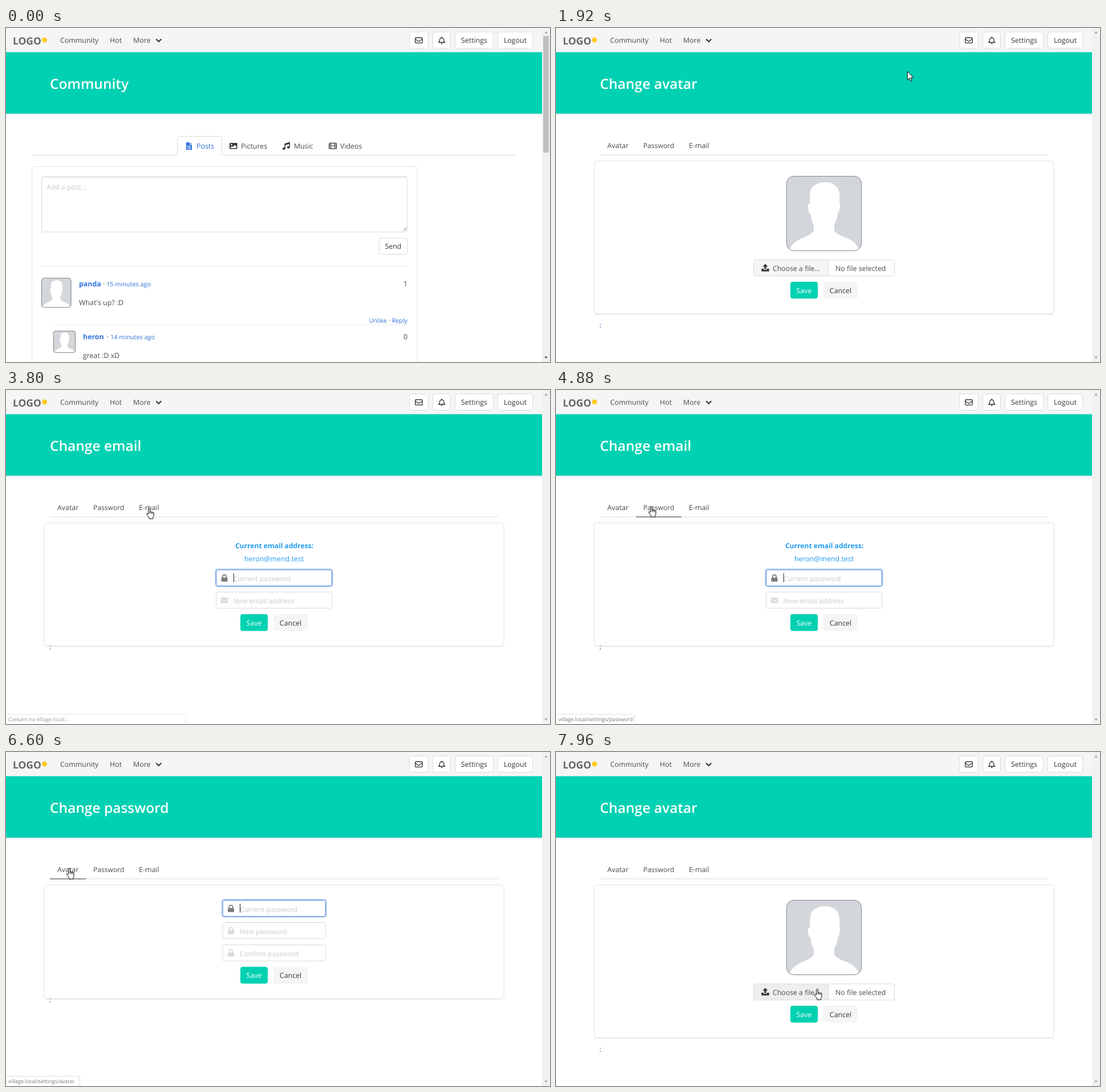
Recreate the animation shown at these times as an HTML page. Size 954 by 587 pixels, loop 8000 ms.

```html
<!DOCTYPE html>
<html lang="en">
<head>
<meta charset="utf-8">
<title>Account settings</title>
<style>
html, body { margin: 0; width: 100%; height: 100%; overflow: hidden; background: #fff; }
svg { display: block; width: 954px; height: 587px; }
text { font-family: "Open Sans", "Noto Sans", sans-serif; text-rendering: geometricPrecision; }
</style>
</head>
<body>
<svg id="stage" viewBox="0 0 954 587"></svg>
<script>
const stage = document.getElementById('stage');
const LOOP = 8000, STEP = 80;
const INK = '#4a4a4a', DARK = '#363636', LINE = '#dbdbdb', LINK = '#3273dc', TEAL = '#00d1b2', HINT = '#c9c9c9';
const HOST = 'village.local';

// Cursor keys: time, tip x, tip y
const path = [
  [160, 916, 559], [760, 827, 17], [1640, 827, 17], [2400, 276, 172], [2480, 276, 172],
  [2760, 251, 208], [4320, 251, 208], [4720, 167, 205], [6120, 167, 205], [6520, 111, 205],
  [7200, 111, 205], [7960, 458, 417]
];
// Status bar: text, start, end (links fade in, waiting fades out)
const wait = `Czekam na ${HOST}...`;
const statuses = [
  [`${HOST}/settings`, 920, 1280], [wait, 1280, 1820],
  [`${HOST}/settings/email`, 2640, 3320], [wait, 3320, 3980],
  [`${HOST}/settings/password`, 4720, 5120], [wait, 5120, 5660],
  [`${HOST}/settings/avatar`, 6520, 6760], [wait, 6760, 7380]
];

const clamp = v => Math.max(0, Math.min(1, v));
const within = (t, ...spans) => spans.some(([a, b]) => t >= a && t < b);

const text = (x, y, s, { size = 12.4, fill = INK, weight = 400, anchor = 'start' } = {}) =>
  `<text x="${x}" y="${y}" font-size="${size}" fill="${fill}" font-weight="${weight}" text-anchor="${anchor}">${s}</text>`;
const rect = (x, y, w, h, fill, stroke = 'none', r = 0, extra = '') =>
  `<rect x="${x}" y="${y}" width="${w}" height="${h}" fill="${fill}" stroke="${stroke}" rx="${r}" ${extra}/>`;
const fillPath = (d, fill = DARK) => `<path d="${d}" fill="${fill}"/>`;
const stroke = (d, color = DARK, width = 1.4) =>
  `<path d="${d}" fill="none" stroke="${color}" stroke-width="${width}"/>`;
const ring = (x, y, w, h) => rect(x - 1, y - 1, w + 2, h + 2, 'none', 'rgba(50,115,220,.25)', 4, 'stroke-width="2"');

function button(x, y, w, label, { fill = '#fff', edge = LINE, color = DARK } = {}) {
  return rect(x + .5, y + .5, w - 1, 28.5, fill, edge, 3) +
    text(x + w / 2, y + 19.7, label, { fill: color, anchor: 'middle' });
}

function card(x, y, w, h) {
  return rect(x - .5, y + 1.5, w + 1, h + 1, 'rgba(10,10,10,.06)', 'none', 5) +
    rect(x, y + .5, w, h, '#fff', '#e2e2e2', 5);
}

function avatar(x, y, size, r) {
  const k = size / 132;
  return rect(x, y, size, size, '#d3d6db', 'none', r) +
    `<g transform="translate(${x} ${y}) scale(${k})">` +
    fillPath('M4 131C8 122 16 114 28 109C38 105 47 101 48 95V86C45 82 43 75 43 67C40 67 38 60 38 53' +
      'C38 49 40 48 41.5 48C41 40 41 32 43 24C47 15 58 11 67 11C78 10 90 16 92 27C93 29 94 36 93 48' +
      'C95 50 94 55 93 59C92 65 91 66 90 66C89 75 87 80 84 85V95C86 101 95 105 106 109' +
      'C118 114 125 122 129 131Z', '#fff') + '</g>' +
    rect(x + .5, y + .5, size - 1, size - 1, 'none', '#858585', r);
}

const lock = (x, y, color) => rect(x - 5.5, y - .8, 11, 7, color, 'none', 1.2) +
  stroke(`M${x - 3.2} ${y}v-2.4a3.2 3.2 0 0 1 6.4 0v2.4`, color, 1.7);
const mail = (x, y, color) => rect(x - 6.5, y - 5, 13, 10, color, 'none', 1.3) +
  stroke(`M${x - 6.5} ${y - 2.5}l6.5 4.3 6.5-4.3`, '#fff', 1);

function field(x, y, w, hint, icon, focus, loaded) {
  return (focus ? ring(x, y, w, 29) : '') +
    rect(x + .5, y + .5, w - 1, 28.5, '#fff', focus ? LINK : LINE, 3) +
    (focus ? '' : stroke(`M${x + 2} ${y + 1.5}h${w - 4}`, '#f0f0f0', 1)) +
    (loaded ? icon(x + 15, y + 15, focus ? '#7a7a7a' : LINE) : '') +
    text(x + 30.5, y + 20.5, hint, { size: 12.1, fill: HINT });
}

const saveCancel = y =>
  button(411, y, 48, 'Save', { fill: TEAL, edge: TEAL, color: '#fff' }) +
  button(469, y, 60, 'Cancel', { fill: '#f5f5f5', edge: '#f5f5f5' });

function header(t, title, loaded) {
  const focus = within(t, [1160, 1440]);
  const hover = within(t, [760, 1160], [1640, 1720]);
  const small = (x, w) => rect(x + .5, 7, w - 1, 28.5, '#fff', LINE, 3);
  const icons = small(707, 34) + small(748, 32) +
    rect(717.7, 17, 12.4, 9.4, 'none', DARK, 1.5, 'stroke-width="1.4"') + stroke('M718 19.5l5.9 4.2 5.9-4.2') +
    stroke('M759 25.3h10.4c-1.5-1.6-1.6-2.6-1.6-4.5a3.6 3.6 0 0 0-7.2 0c0 1.9-.1 2.9-1.6 4.5zM764.2 15.2v2') +
    stroke('M762.8 27.3h2.8', DARK, 1.6);
  return rect(0, 0, 940, 42.5, '#f5f5f5') +
    text(12, 28.5, 'LOGO', { size: 17.4, weight: 700, fill: '#666' }) +
    '<circle cx="67.5" cy="21" r="4.5" fill="#fc2"/>' +
    text(95, 26, 'Community') + text(182, 26, 'Hot') + text(223, 26, 'More') +
    stroke('M263.3 19.5l4.5 4.5 4.5-4.5', DARK, 2.2) +
    (loaded ? icons : small(731, 21) + small(759, 21)) +
    (focus ? ring(787, 6.5, 68, 29) : '') +
    button(787, 6.5, 68, 'Settings', { edge: focus ? LINK : hover ? '#b5b5b5' : LINE }) +
    button(862, 6.5, 62, 'Logout') +
    rect(0, 42.5, 940, 108, TEAL) + rect(0, 150.5, 940, 1.5, 'rgba(0,0,0,.1)') +
    text(77, 107, title, { size: 24.5, weight: 600, fill: '#fff' });
}

function scrollbar(active) {
  return rect(940, 0, 14, 587, '#f1f1f1') + (active ? rect(942, 14, 10, 205, '#c1c1c1') : '') +
    fillPath('M944 9.5l3-3.5 3 3.5z', '#a3a3a3') +
    fillPath('M944 577.5l3 3.5 3-3.5z', active ? '#505050' : '#a3a3a3');
}

function post(x, y, name, age, votes, message) {
  return text(x, y, name, { weight: 700, fill: LINK }) +
    text(x + 41.8, y, '·') + text(x + 48, y, age, { size: 10.9, fill: LINK }) +
    text(704, y, votes, { anchor: 'end' }) + text(x, y + 32.5, message);
}

function community() {
  const small = { size: 10.7, fill: LINK };
  return stroke('M45 223.5h849', LINE, 1) +
    `<path d="M300.5 224.5v-31a3 3 0 0 1 3-3h72a3 3 0 0 1 3 3v31" fill="#fff" stroke="${LINE}"/>` +
    rect(301, 222, 77, 3, '#fff') +
    fillPath('M316 201h6v4h4v9.3h-10zM323 201l3 3h-3z', LINK) +
    stroke('M318 207.5h6m-6 2.3h6m-6 2.3h6', '#fff', 1) +
    rect(392, 202, 13.5, 10.6, DARK, 'none', 1.3) + '<circle cx="395.5" cy="205" r="1.3" fill="#fff"/>' +
    fillPath('M394 211v-1.5l2.2-2 1.5 1.4 3.5-3.5 2.8 2.8v2.8z', '#fff') +
    stroke('M489.3 212v-8l7.9-2.4v8', DARK, 1.5) + fillPath('M488.6 203.2l9.3-2.8v3l-9.3 2.8z') +
    '<g fill="#363636"><ellipse cx="487.4" cy="212" rx="2.5" ry="2"/><ellipse cx="495.4" cy="209.8" rx="2.5" ry="2"/></g>' +
    rect(566.7, 202.4, 12.8, 9.8, 'none', DARK, 1, 'stroke-width="1.3"') +
    stroke('M569.7 202v10m6.8-10v10m-6.8-5h6.8m-10 -1.7h3m-3 3.4h3m7-3.4h3m-3 3.4h3', DARK, 1.1) +
    text(334, 212, 'Posts', { fill: LINK }) + text(412, 212, 'Pictures') +
    text(505, 212, 'Music') + text(586, 212, 'Videos') +
    card(45.5, 243, 675.5, 400) +
    rect(62.5, 261.5, 641, 97, '#fff', LINE, 3) + stroke('M64 262h638', '#d4d4d4', 1) +
    stroke('M696.5 356.5l6-6m-3 6l3-3', '#777', 1) +
    text(71, 284, 'Add a post...', { fill: HINT, size: 12.2 }) +
    button(654, 368.5, 50, 'Send') + rect(62, 417.3, 642, 1.6, '#f0f0f0') +
    avatar(62, 439, 52.5, 5) + post(128, 454, 'panda', '15 minutes ago', 1, "What's up? :D") +
    text(636.5, 517.5, 'Unlike', small) + text(671, 517.5, '·') + text(704, 517.5, 'Reply', { ...small, anchor: 'end' }) +
    rect(83, 520.8, 621, 1.4, '#f0f0f0') +
    avatar(83, 532, 39, 4) + post(135, 547, 'heron', '14 minutes ago', 0, 'great :D xD');
}

function tabs(t) {
  const mark = (x, w) => stroke(`M${x} 223h${w}`, DARK, 1.2);
  return text(90, 211, 'Avatar') + text(153, 211, 'Password', { size: 12.1 }) + text(233, 211, 'E-mail') +
    stroke('M77 223h786', LINE, 1.2) +
    (within(t, [2640, 3480]) ? mark(220, 62) : '') +
    (within(t, [4560, 5240], [6120, 6280]) ? mark(140, 80) : '') +
    (within(t, [6280, 6880]) ? mark(77, 63) : '');
}

const semicolon = y => text(76.5, y, ';', { size: 11, fill: '#4444b8' });
const caret = (t, since, x, y) => Math.floor((t - since) / 520) % 2 ? '' : rect(x, y, 1, 16, '#222');

function avatarPage(t, loaded) {
  return card(67, 233, 806, 268.5) + avatar(404, 260, 132, 13) +
    rect(346.5, 407.5, 131, 28.5, t >= 7960 ? '#eee' : '#f5f5f5', LINE, 3) +
    rect(477.5, 407.5, 116, 28.5, '#fff', LINE, 3) +
    text(380, 427, 'Choose a file...', { size: 12.3 }) + text(490, 427, 'No file selected') +
    (loaded ? fillPath('M367 414.5l4.5 4.7h-2.8v4.3h-3.4v-4.3h-2.8zM360.3 423h3.7v1.8h6v-1.8h3.7v4.8h-13.4z') +
      semicolon(526) : '') + saveCancel(446);
}

function emailPage(t, loaded) {
  const focus = t < 4960, blue = { fill: '#209cee', anchor: 'middle' };
  return card(67, 233, 806, 216.5) + semicolon(455) +
    text(470.5, 277.5, 'Current email address:', { ...blue, size: 12.1, weight: 700 }) +
    text(470, 300.5, 'heron@mend.test', blue) +
    field(368, 315.5, 204, 'Current password', lock, focus, loaded) +
    field(368, 354.5, 204, 'New email address', mail, false, loaded) +
    (focus ? caret(t, 3520, 398.7, 322) : '') + saveCancel(394);
}

function passwordPage(t) {
  const focus = t < 6640;
  return card(67, 233, 806, 200) + semicolon(439) +
    field(379.5, 260, 181.5, 'Current password', lock, focus, true) +
    field(379.5, 299, 181.5, 'New password', lock, false, true) +
    field(379.5, 338.3, 181.5, 'Confirm password', lock, false, true) +
    (focus ? caret(t, 5200, 410, 266.5) : '') + saveCancel(377.5);
}

function status(t) {
  const now = statuses.find(([, a, b]) => within(t, [a, b]));
  if (!now) return '';
  const [label, start, end] = now, waiting = label === wait;
  const alpha = waiting ? clamp((end - t) / 240) : clamp((t - start + STEP) / 160);
  const w = waiting ? 316 : 10 + label.length * 4.12;
  return `<g opacity="${alpha.toFixed(2)}">` +
    `<path d="M-1 570h${w - 2}a3 3 0 0 1 3 3v16H-1z" fill="#fff" stroke="#dcdcdc"/>` +
    text(4, 582, label, { size: 9.2, fill: '#777' }) + '</g>';
}

function cursor(t) {
  if (t < path[0][0]) return '';
  const i = path.findLastIndex(k => t >= k[0]);
  const [t0, x0, y0] = path[i], [t1, x1, y1] = path[i + 1] || [LOOP, x0, y0];
  const p = clamp((Math.floor((t - t0) / STEP) + 1) * STEP / (t1 - t0));
  const e = p * p * (3 - 2 * p);
  const x = x0 + (x1 - x0) * e, y = y0 + (y1 - y0) * e;
  const hand = within(t, [720, 1720], [2640, 7280], [7840, LOOP]);
  const d = hand
    ? 'M-1.4 10V1.2a1.4 1.4 0 0 1 2.8 0V6.4a1.2 1.2 0 0 1 2.3.5 1.2 1.2 0 0 1 2.3.6 1.1 1.1 0 0 1 2.1.7V12' +
      'c0 2-1.6 3-1.6 6.3H.2C.1 15-3.9 12-4.5 10.2c-.5-1.5 1.4-2 2.2-.8z'
    : 'M0 0V15L3.5 11.7 5.8 17 8 16 5.8 10.9H10.5Z';
  return `<path transform="translate(${x.toFixed(1)} ${y.toFixed(1)})" d="${d}" fill="#fff" stroke="#000" stroke-linejoin="round"/>` +
    (hand ? `<path transform="translate(${x.toFixed(1)} ${y.toFixed(1)})" d="M1.4 6v3M3.7 7v2.5M6 7.8v2" stroke="#000" stroke-width=".9"/>` : '');
}

function scene(t) {
  const loaded = !within(t, [1440, 1640], [3480, 3560], [6880, 6960]);
  let title = 'Change avatar', body;
  if (t < 1440) {
    title = 'Community';
    body = community();
  } else {
    body = tabs(t);
    if (within(t, [3480, 5240])) {
      title = 'Change email';
      body += emailPage(t, loaded);
    } else if (within(t, [5240, 6880])) {
      title = 'Change password';
      body += passwordPage(t);
    } else body += avatarPage(t, loaded);
  }
  return header(t, title, loaded) + body + scrollbar(t < 1440) + status(t) + cursor(t);
}

let last = '';
function frame() {
  const html = scene(performance.now() % LOOP);
  if (html !== last) stage.innerHTML = last = html;
  requestAnimationFrame(frame);
}
frame();
</script>
</body>
</html>
```
